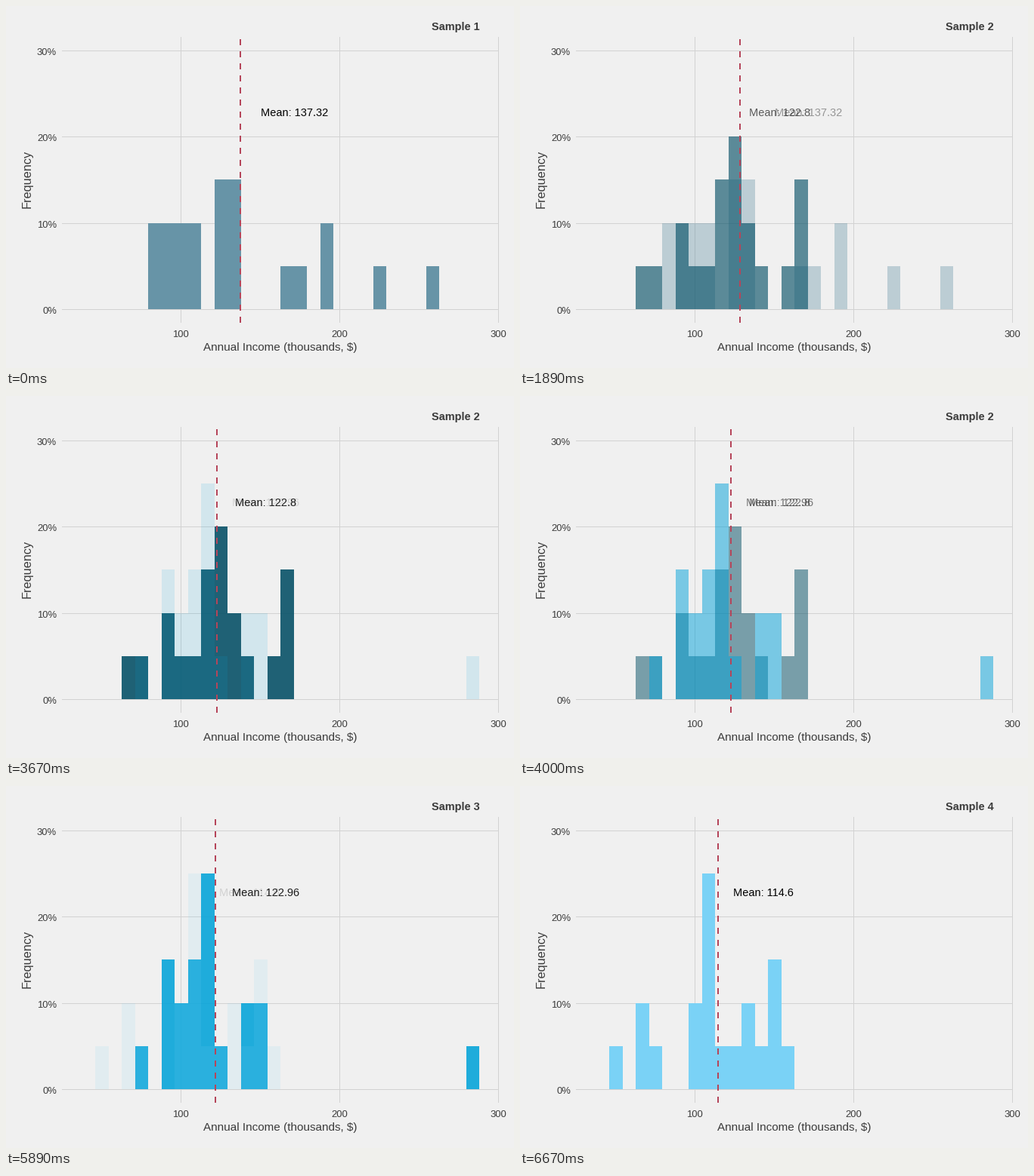
Write a matplotlib script that moves like this. It is 672 px wide and 480 px high and loops after 8000 ms.

```python
import math

import matplotlib.pyplot as plt
import numpy as np
from matplotlib.animation import FuncAnimation
from matplotlib.collections import PolyCollection
from matplotlib.patches import Rectangle

W, H, DPI = 672, 480, 100
LOOP, TICK = 8000, 20        # ms
FPS = 9                      # rate of the stepped motion
CYCLE, HOLD = 20, 12         # steps per sample, steps at rest
PT = 72 / DPI                # points per pixel
PEOPLE = 20                  # observations per sample

PAPER, GRID, INK, MEAN_RED = "#f0f0f0", "#d2d2d2", "#3c3c3c", "#b5455a"
LEFT, RIGHT, TOP, BOTTOM = 74, 651, 41, 420
ZERO_Y, UNIT_H = 402.3, 57.29        # one observation is 5%
BIN_X, BIN_W = 117.99, 17.519

# colour, mean, key points (rank, bin) of the sorted income curve
SAMPLES = [
    ("#6794a7", 137.32, [(0, 4), (7, 7.5), (8, 9), (13, 10.7), (14, 14),
                         (16, 17), (17, 17), (19, 25)]),
    ("#014d64", 122.8, [(0, 2), (2, 5), (3, 5), (6, 8.1), (14, 10.58),
                        (16, 13), (17, 14), (19, 14)]),
    ("#01a2d9", 122.96, [(0, 3), (1, 5.1), (9, 8.3), (13, 8.9), (15, 11),
                         (18, 12.6), (19, 28)]),
    ("#7ad2f6", 114.6, [(0, 0), (1, 2), (3, 3), (4, 6.7), (10, 7.9),
                        (13, 10.3), (16, 12.1), (19, 13)]),
]

plt.rcParams["font.family"] = "Liberation Sans"
fig = plt.figure(figsize=(W / DPI, H / DPI), dpi=DPI, facecolor=PAPER)
ax = fig.add_axes([0, 0, 1, 1])
ax.set_xlim(0, W)
ax.set_ylim(H, 0)
ax.axis("off")


def snap(v):
    return math.floor(v + 0.5)


def income_x(value):
    return 231.2 + 2.1 * (value - 100)


def count_y(n):
    return snap(ZERO_Y - n * UNIT_H)


def bin_x(k):
    return snap(BIN_X + k * BIN_W)


def label(x, y, text, size, color=INK, **kw):
    return ax.text(x, y, text, fontsize=size * PT, color=color,
                   va="baseline", **kw)


def rule(x, y, w, h):
    ax.add_patch(Rectangle((x, y), w, h, fc=GRID, lw=0, aa=False, zorder=1))


def histogram(color, curve):
    """Bin the observations along the sorted curve and stack them as bars."""
    bins = np.interp(np.arange(PEOPLE), *zip(*curve)).astype(int)
    boxes = []
    for k, n in enumerate(np.bincount(bins)):
        x0, x1, y0, y1 = bin_x(k), bin_x(k + 1), count_y(n), count_y(0)
        if n:
            boxes.append([(x0, y0), (x1, y0), (x1, y1), (x0, y1)])
    art = PolyCollection(boxes, facecolors=color, linewidths=0,
                         antialiaseds=False, zorder=2)
    ax.add_collection(art, autolim=False)
    return art


# grid and axes
for percent in range(0, 40, 10):
    y = count_y(percent / 5)
    rule(LEFT, y, RIGHT - LEFT, 1)
    label(67, y + 6, f"{percent}%", 13, ha="right")
for income in (100, 200, 300):
    x = snap(income_x(income))
    rule(x, TOP, 1, BOTTOM - TOP)
    label(x, 439, str(income), 13, ha="center")
label(261, 457, "Annual Income (thousands, $)", 15.3)
label(33, 229.5, "Frequency", 16.3, rotation=90, rotation_mode="anchor",
      ha="center")

# moving parts
title = label(563, 32, "", 14.5, weight="bold")
hists = [histogram(color, curve) for color, _, curve in SAMPLES]
notes = [label(income_x(1.25 * mean), 146, f"Mean: {mean}", 14.5, "black",
               ha="center", zorder=5) for _, mean, _ in SAMPLES]
mean_line, = ax.plot([0, 0], [BOTTOM, TOP], color=MEAN_RED, lw=2 * PT,
                     ls=(0, (4, 4)), dash_capstyle="butt", zorder=4)


def draw(i):
    t = i * TICK + TICK / 2
    step = int((t + 5) * FPS / 1000)
    cur, phase = divmod(step, CYCLE)
    nxt = min(cur + 1, len(SAMPLES) - 1)
    p = max(0, phase - HOLD) / (CYCLE - HOLD) if nxt != cur else 0

    for k, pair in enumerate(zip(hists, notes)):
        alpha = 1 - p if k == cur else p if k == nxt else 0
        for art in pair:
            art.set_visible(alpha > 0)
            art.set_alpha(alpha)

    a, b = SAMPLES[cur][1], SAMPLES[nxt][1]
    x = snap(income_x(a + (b - a) * p))
    mean_line.set_xdata([x, x])
    title.set_text(f"Sample {(nxt if p > 0.5 else cur) + 1}")
    return [*hists, *notes, mean_line, title]


anim = FuncAnimation(fig, draw, frames=LOOP // TICK, interval=TICK,
                     init_func=lambda: draw(0), repeat=True, repeat_delay=0)
plt.show()
```
